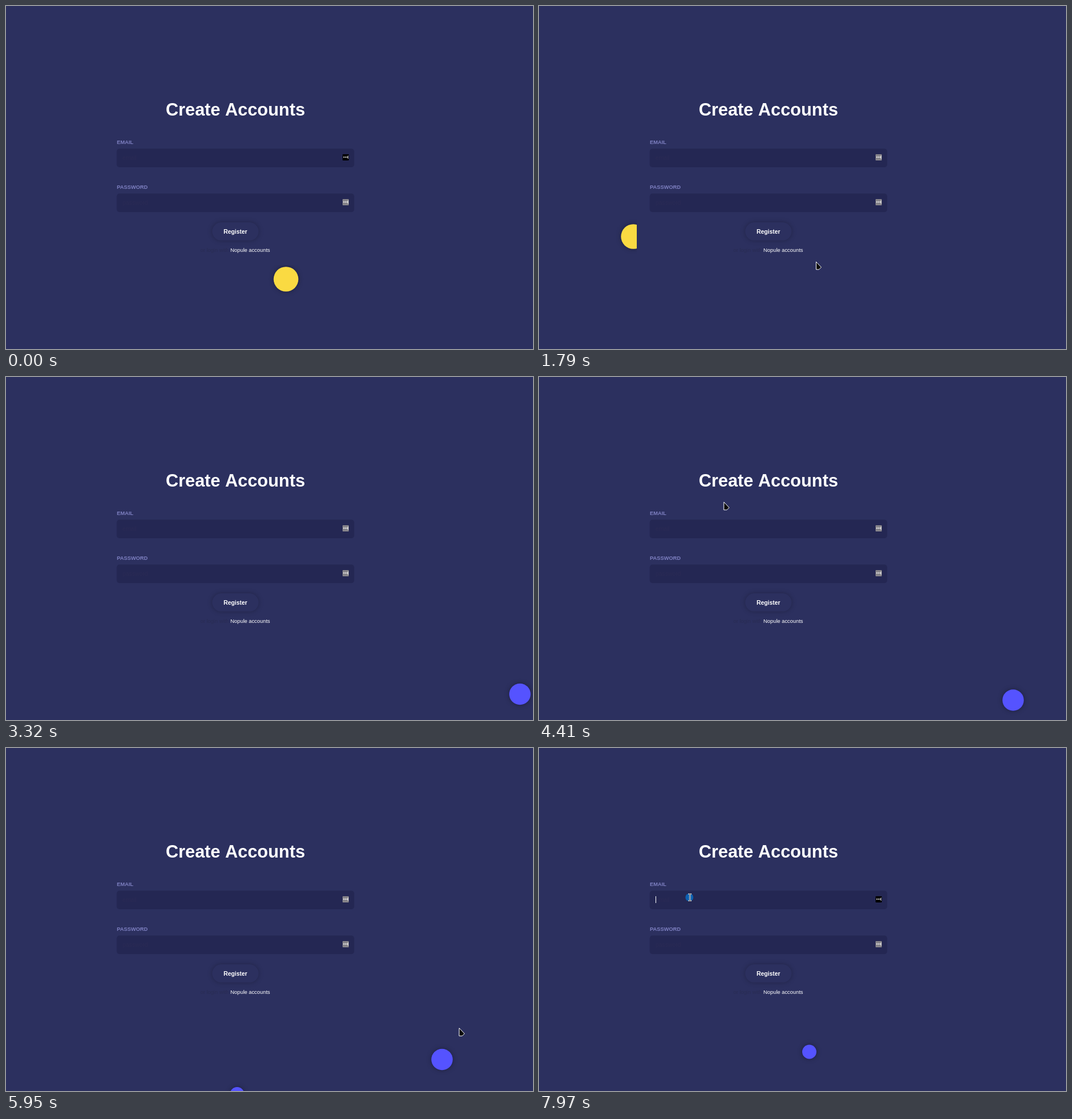
Animation, 927 px wide and 604 px high, one loop 8000 ms. Source, as an HTML page with a canvas:

```html
<!DOCTYPE html>
<html lang="en">
<head>
<meta charset="utf-8">
<title>Create Accounts</title>
<style>
  html, body { margin: 0; width: 100%; height: 100%; overflow: hidden; background: #2c305f; }
  canvas { display: block; width: 927px; height: 604px; }
</style>
</head>
<body>
<canvas id="stage"></canvas>
<script>
const W = 927, H = 604, LOOP = 8000;
const BG = '#2c305f', FIELD = '#242753', FONT = 'Arial, "Liberation Sans", sans-serif';
const BLUR_AT = 1300, FOCUS_AT = 7800, CARET_AT = 7910;
const canvas = document.getElementById('stage');
const ctx = canvas.getContext('2d');
const ratio = window.devicePixelRatio || 1;
canvas.width = W * ratio;
canvas.height = H * ratio;
ctx.scale(ratio, ratio);

// A path is a few [time, x, y] points joined by a smooth curve
const balls = [
  { r: 21.8, color: '#fada42', path: [
    [940, 492.5, 481], [1400, 400, 475], [1790, 166, 406], [2150, -32, 230]] },
  { r: 18.8, color: '#5553ff', path: [
    [2930, 952, 535], [3320, 904, 558.5], [4410, 834, 569], [5950, 767, 548.5], [6600, 600, 425]] },
  { r: 12.5, color: '#5553ff', path: [
    [5500, 392, 640], [5950, 406.5, 609.5], [6960, 452.5, 581], [7970, 475.5, 535]] }
];

const pointerPaths = [
  [[960, 430, 606], [1790, 488, 451], [2540, 932, 440]],
  [[3420, 800, 606], [4410, 326, 221], [4720, 159, 262], [5850, 838, 510], [5950, 798, 494],
   [6960, 284, 211], [7300, 65, 245], [7720, 265, 263]]
];

function pointAt(path, t) {
  const last = path.length - 1;
  const key = n => path[Math.max(0, Math.min(last, n))];
  if (t <= path[0][0]) return path[0].slice(1);
  if (t >= path[last][0]) return path[last].slice(1);
  const i = path.findIndex(k => k[0] > t) - 1;
  const a = key(i), b = key(i + 1), h = b[0] - a[0], u = (t - a[0]) / h;
  return [1, 2].map(axis => {
    const slope = n => (key(n + 1)[axis] - key(n - 1)[axis]) / (key(n + 1)[0] - key(n - 1)[0]);
    const ease = u * u * (3 - 2 * u);
    const bend = u * (1 - u) * ((1 - u) * slope(i) - u * slope(i + 1));
    return a[axis] + (b[axis] - a[axis]) * ease + h * bend;
  });
}

function box(x, y, w, h, r, color) {
  ctx.fillStyle = color;
  ctx.beginPath();
  ctx.roundRect(x, y, w, h, r);
  ctx.fill();
}

function text(str, x, y, size, color, weight = 'normal', align = 'left') {
  ctx.font = `${weight} ${size}px ${FONT}`;
  ctx.fillStyle = color;
  ctx.textAlign = align;
  ctx.fillText(str, x, y);
}

function withShadow(alpha, blur, draw) {
  ctx.save();
  ctx.shadowColor = `rgba(0, 0, 0, ${alpha})`;
  ctx.shadowBlur = blur * ratio;
  draw();
  ctx.restore();
}

function disc(x, y, r, color) {
  ctx.fillStyle = color;
  ctx.beginPath();
  ctx.arc(x, y, r, 0, Math.PI * 2);
  ctx.fill();
}

function fieldIcon(y, color) {
  box(592, y, 11, 11, 1, color);
  for (let i = 0; i < 3; i++) box(593.4 + i * 2.7, y + 4.4, 1.8, 1.8, 0.6, '#fff');
  box(601.2, y + 2.6, 0.9, 5.6, 0, '#fff');
}

function field(label, hint, y, iconColor) {
  text(label, 195, y - 8, 9.36, '#7d7fc0', 'bold');
  box(194.7, y, 417.8, 32.8, 5, FIELD);
  text(hint, 205, y + 20, 10.4, '#2b2b55');
  fieldIcon(y + 9.7, iconColor);
}

function form(t) {
  const focused = t < BLUR_AT || t >= FOCUS_AT;
  box(172, 140, 463, 316, 0, BG);
  text('Create Accounts', 403.5, 193, 30.85, '#fff', 'bold', 'center');
  field('EMAIL', 'email', 251.2, focused ? '#000' : '#86848a');
  field('PASSWORD', 'password', 330.2, '#86848a');
  withShadow(0.25, 8, () => box(362.7, 381, 81.6, 31.8, 15.9, BG));
  text('Register', 403.5, 401, 10.4, '#fff', 'bold', 'center');
  text('or login with', 342, 433, 9.36, '#292c53');
  text('Nopule accounts', 394.8, 433, 9.36, '#fff');
  if (t >= CARET_AT) box(205, 261, 1, 12, 0, '#fff');
}

function arrow(x, y) {
  ctx.beginPath();
  ctx.moveTo(x, y);
  ctx.lineTo(x + 9, y + 9.5);
  ctx.lineTo(x + 5, y + 13.5);
  ctx.lineTo(x, y + 13.5);
  ctx.closePath();
  ctx.fillStyle = '#0b0b0b';
  ctx.fill();
  ctx.strokeStyle = '#fff';
  ctx.lineWidth = 1;
  ctx.stroke();
}

function beam(x, y) {
  ctx.beginPath();
  for (const s of [-1, 1]) {
    ctx.moveTo(x - 1.5, y + s * 6);
    ctx.lineTo(x + 1.5, y + s * 6);
  }
  ctx.moveTo(x, y - 6);
  ctx.lineTo(x, y + 6);
  ctx.lineCap = 'square';
  ctx.strokeStyle = '#fff';
  ctx.lineWidth = 2.2;
  ctx.stroke();
  ctx.strokeStyle = '#111';
  ctx.lineWidth = 0.7;
  ctx.stroke();
}

function pointer(t) {
  const path = pointerPaths.find((p, i) => t >= p[0][0] && (i === 1 || t <= p[p.length - 1][0]));
  if (!path) return;
  const [x, y] = pointAt(path, t).map(v => Math.round(v) - 0.5);
  const overField = x > 195 && x < 612 && ((y > 251 && y < 284) || (y > 330 && y < 363));
  if (t >= FOCUS_AT) disc(x, y + 0.5, 7, '#0c5fb0');
  if (overField) beam(x + 1, y + 0.5);
  else arrow(x, y);
}

function draw(t) {
  ctx.fillStyle = BG;
  ctx.fillRect(0, 0, W, H);
  for (const { r, color, path } of balls) {
    const [x, y] = pointAt(path, t);
    withShadow(0.35, 9, () => disc(x, y, r, color));
  }
  form(t);
  pointer(t);
}

let start;
function frame(now) {
  if (start === undefined) start = now;
  draw((now - start) % LOOP);
  requestAnimationFrame(frame);
}
requestAnimationFrame(frame);
</script>
</body>
</html>
```
